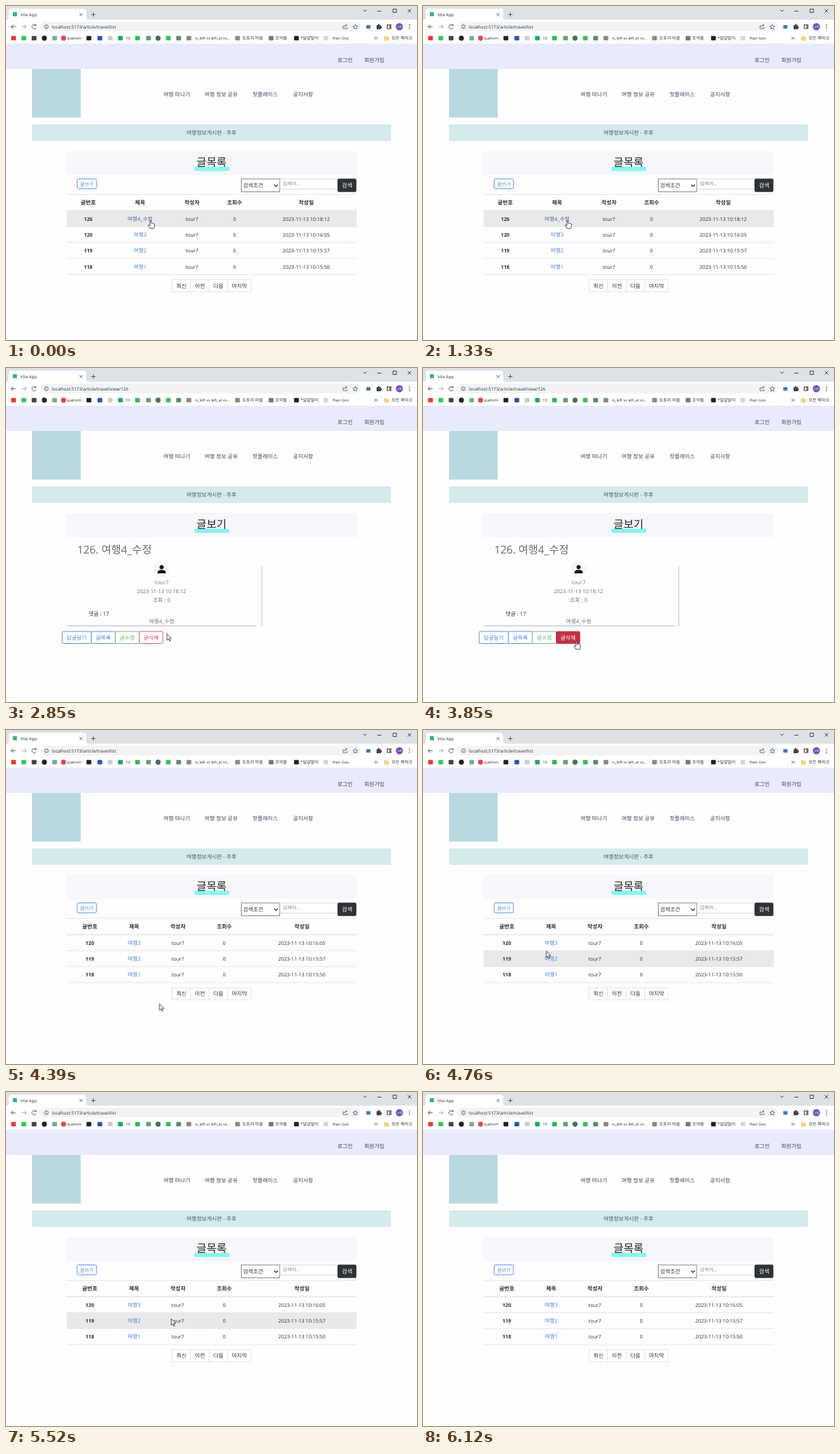
Write an HTML page that moves like this. It is 600x488 px and loops after 6180 ms.

```html
<!DOCTYPE html>
<html lang="ko">
<head>
<meta charset="utf-8">
<title>Travel board</title>
<style>
  html, body { margin: 0; width: 100%; height: 100%; overflow: hidden; background: #fefdff; }
  svg { display: block; width: 600px; height: 488px; }
  text { font-family: 'Open Sans', 'Noto Sans CJK KR', 'Noto Sans CJK', sans-serif; text-rendering: geometricPrecision; white-space: pre; }
</style>
</head>
<body>
<svg viewBox="0 0 600 488">
  <g id="chrome"></g>
  <g id="page"></g>
  <g id="cursor" stroke-linejoin="round">
    <path id="arrow" d="M0 0V9.4L2.2 7.4L3.7 10.7L5.2 10L3.7 6.8H6.6Z" fill="#fff" stroke="#222" stroke-width=".8"/>
    <path id="hand" d="M-.9 0Q0-1.2 .9 0V3.4Q2 2.8 2.6 3.7Q3.7 3.2 4.2 4.1Q5.6 3.8 5.7 5.2V7.7Q5.6 9.2 4.8 11H-.8Q-1.6 9-3.2 7Q-3.5 5.6-2.2 5.7L-.9 6.8Z" fill="#fff" stroke="#222" stroke-width=".8"/>
  </g>
</svg>
<script>
const LOOP = 6180, OPEN_POST = 1360, DELETED = 3880, POINTER_GONE = 5880;
const INK = '#2b3036', BLUE = '#4a82dc', GREY = '#80858b', USER = 'tour7';
const $ = id => document.getElementById(id);

const text = (x, y, str, { size = 8, fill = INK, anchor = 'middle', weight = 400 } = {}) =>
  `<text x="${x}" y="${y}" font-size="${size}" fill="${fill}" text-anchor="${anchor}" font-weight="${weight}">${str}</text>`;
const left = (x, y, str, size = 8, fill = INK) => text(x, y, str, { size, fill, anchor: 'start' });
const rect = (x, y, w, h, fill, r = 0, stroke = 'none') =>
  `<rect x="${x}" y="${y}" width="${w}" height="${h}" rx="${r}" fill="${fill}" stroke="${stroke}" stroke-width=".9"/>`;
const dot = (x, y, r, fill) => `<circle cx="${x}" cy="${y}" r="${r}" fill="${fill}"/>`;
const stroke = (d, color = '#50555a', width = 1) =>
  `<path d="${d}" fill="none" stroke="${color}" stroke-width="${width}"/>`;

function browser() {
  const squares = [[11, '#e33b35'], [26, '#35c759'], [41, '#444'], [71, '#7fa89b'], [121, '#222'], [137, '#2b56a5'],
    [152, '#c9cdd2'], [167, '#22a565'], [192, '#35b558'], [208, '#6f9b72'], [237, '#3ebd5c'], [252, '#5c8a6a'],
    [267, '#8c8780'], [338, '#8c8780'], [387, '#77777a'], [424, '#222'], [467, '#d5d8db']];
  const circles = [[56, '#222'], [84, '#dc4a48'], [222, '#4d6b66']];
  const labels = [[89, 'quelvim'], [175, '10'], [276, 'is_left vs left_at vs...'], [345, '도토리 마을'],
    [393, '조약돌'], [430, '*달걀말이'], [477, 'Rian Goo'], [563, '모든 북마크']];
  const labelSize = s => /[가-힣]/.test(s) ? 6.2 : 5.6;
  return rect(0, 0, 600, 20, '#dee1e6') +
    `<path d="M1 20Q4 20 4 16V8Q4 4 8 4H113Q117 4 117 8V16Q117 20 120 20Z" fill="#fff"/>` +
    rect(10, 9, 6, 6, '#3fb27f') + left(21, 14.6, 'Vite App', 6.2) +
    stroke('M107.5 10.5l4 4m0-4l-4 4M124.5 12.5h6m-3-3v6') +
    stroke('M521.5 5.5l2.5 2.5l2.5-2.5M542 7.5h6M565 4.5h5v5h-5zM586.5 4.5l5 5m0-5l-5 5', '#333', .9) +
    rect(0, 20, 600, 35, '#fff') + rect(50, 23, 468, 14, '#f1f3f4', 7) +
    stroke('M14 30.2H7.5m3-3l-3 3l3 3') + stroke('M23 30.2h6.5m-3-3l3 3l-3 3', '#a5a9ad') +
    stroke('M43.5 28.2A3.2 3.2 0 1 0 44 31.5M44 26.5v2.2h-2.4') +
    `<circle cx="59" cy="30.3" r="2.8" fill="none" stroke="#50555a" stroke-width=".8"/>` +
    stroke('M59 29.8v2m0-3.4v.6', '#50555a', .8) +
    stroke('M493.5 29H492v4h6v-2M493.8 31q.5-3 4-3m-1.7-1.7l1.8 1.7l-1.8 1.7', '#50555a', .8) +
    stroke('M510 27l1 2.2l2.4.3l-1.8 1.6l.5 2.4l-2.1-1.2l-2.1 1.2l.5-2.4l-1.8-1.6l2.4-.3z', '#50555a', .8) +
    rect(526, 28, 6, 5, '#4778ad') +
    `<path d="M541 28h2q0-2 1.2-2t1.2 2h2v2q1.6 0 1.6 1.2t-1.6 1.2v1.6H541z" fill="#444"/>` +
    stroke('M556.5 27.5h5.5v5.5h-5.5zM560.5 27.5v5.5', '#444', 1.1) +
    dot(574.3, 30.3, 5.2, '#7350b0') + text(574.3, 32, '나루', { size: 4.2, fill: '#fff' }) +
    [27.5, 30.3, 33.1].map(y => dot(589, y, .8, '#444')).join('') +
    squares.map(([x, c]) => rect(x - 3.5, 43.7, 7, 6.5, c, 1)).join('') +
    circles.map(([x, c]) => dot(x, 47, 3.7, c)).join('') +
    labels.map(([x, s]) => left(x, 49.3, s, labelSize(s))).join('') +
    stroke('M538 45l2 2l-2 2m2.5-4l2 2l-2 2', '#444', .8) +
    '<path d="M552 44h2.5l1 1h3.5v5.5h-7z" fill="#f3d27a"/>';
}

function site() {
  const menu = [[484, 82, '로그인'], [523, 82, '회원가입'], [230, 131.5, '여행 떠나기'],
    [290, 131.5, '여행 정보 공유'], [360, 131.5, '핫플레이스'], [419, 131.5, '공지사항']];
  return rect(0, 55, 600, 37, '#e9ebfb') + rect(38, 92, 71, 71, '#bad9df') +
    menu.map(([x, y, s]) => left(x, y, s, 8, '#3a4554')).join('') +
    rect(38, 173, 524, 24, '#d6eaec', 2) + text(300, 187.8, '여행정보게시판 - 추후', { fill: '#455a62' }) +
    rect(88, 212, 424, 35, '#f7f7fb') + rect(275, 235, 51, 6, '#86f6ef', 1);
}

const heading = str => text(300, 234, str, { size: 16, fill: '#222' });
const ROW_TOP = 299, ROW_H = 23.35;
const POSTS = [[126, '여행4_수정', '10:18:12'], [120, '여행3', '10:16:05'], [119, '여행2', '10:15:57'], [118, '여행1', '10:15:50']];
const BUTTONS = [[82, 42.5, '답글달기', BLUE], [124.5, 35, '글목록', BLUE], [159.5, 35, '글수정', '#64ad6c'], [194.5, 34.5, '글삭제', '#d05062']];

function list(posts, cols, hovered) {
  const line = (y, c = '#dfe2e6') => rect(88.5, y - .4, 423.5, .8, c);
  const heads = ['글번호', '제목', '작성자', '조회수', '작성일'];
  const rows = posts.map(([id, title, time], i) => {
    const top = ROW_TOP + i * ROW_H, y = top + 14.6;
    const cells = [id, title, USER, 0, '2023-11-13 ' + time];
    return (i === hovered ? rect(88.5, top, 423.5, ROW_H, '#e9e9ea') : '') + line(top + ROW_H) +
      cells.map((s, c) => text(cols[c], y, s, {
        size: c === 1 ? 7.8 : c === 2 ? 7.2 : 7.3, weight: c ? 400 : 700,
        fill: c !== 1 ? INK : i === hovered && title.length > 3 ? '#4c639c' : BLUE
      })).join('');
  }).join('');
  const bottom = ROW_TOP + posts.length * ROW_H + 7.6;
  const pager = [[242.5, 27, '최신'], [269.5, 27, '이전'], [296.5, 27, '다음'], [323.5, 34.5, '마지막']]
    .map(([x, w, s]) => rect(x, bottom, w, 17.5, '#fff', 0, '#dee2e6') + text(x + w / 2, bottom + 11.7, s)).join('');
  return heading('글목록') +
    rect(104, 252.7, 28, 14.3, '#fff', 1.5, BLUE) + text(118, 262.5, '글쓰기', { size: 7.3, fill: BLUE }) +
    rect(343.5, 252.8, 56, 18.6, '#fff', 0, '#777') + left(346, 265, '검색조건') +
    stroke('M391.5 261l2.7 2.7l2.7-2.7', '#222', 1.2) +
    rect(400, 252.8, 84, 14.8, '#fff', 0, '#d3d6da') + left(404, 262.4, '검색어...', 7, GREY) +
    rect(484, 252.3, 27.5, 19.5, '#2e3237', 2) + text(498, 265, '검색', { size: 8.3, fill: '#fff' }) +
    line(275.5) + line(ROW_TOP, '#c9ccd0') +
    heads.map((s, c) => text(cols[c], 289.7, s, { weight: 700 })).join('') + rows + pager;
}

function post(hovered) {
  return heading('글보기') + left(104, 271.2, '126. 여행4_수정', 15.7, '#666b70') +
    dot(227, 293.7, 11.5, '#f6f6f9') + dot(227.2, 291, 3, '#111') +
    `<path d="M221.2 300V298Q222 295 227.2 295T233.2 298V300Z" fill="#111"/>` +
    text(227.3, 315.6, USER, { fill: GREY }) +
    text(227, 328.8, '2023-11-13 10:18:12', { size: 7.6, fill: '#70757a' }) +
    text(227.3, 342, '조회 : 0', { fill: '#70757a' }) +
    left(120.5, 361.5, '댓글 : 17') + text(227.3, 373.2, '여행4_수정', { size: 7.9, fill: '#70757a' }) +
    rect(89, 376, 277, 1.5, '#cbccce') + rect(372.7, 290, 1.5, 87.5, '#d6d7d9') +
    BUTTONS.map(([x, w, s, c], i) => {
      const on = i === hovered;
      return rect(x, 385, w, 17.5, on ? '#c23145' : '#fff', 1.5, on ? '#b92c40' : c) +
        text(x + w / 2, 396.8, s, { fill: on ? '#fff' : c });
    }).join('');
}

// Pointer stops: time, x, y
const PATH = [[0, 211, 314], [1400, 211, 314], [1910, 297, 322], [2390, 297, 322], [3000, 224, 400],
  [4390, 224, 400], [4760, 180, 323], [4970, 188, 311], [5030, 188, 311], [5120, 190, 310],
  [5360, 190, 310], [5610, 262, 340], [LOOP, 262, 340]];

function pointerAt(t) {
  const i = PATH.findIndex(stop => stop[0] > t);
  const [t0, x0, y0] = PATH[i - 1], [t1, x1, y1] = PATH[i];
  const p = (t - t0) / (t1 - t0), e = p * p * (3 - 2 * p);
  return [x0 + (x1 - x0) * e, y0 + (y1 - y0) * e];
}

function sceneAt(t, x, y) {
  if (t >= OPEN_POST && t < DELETED) {
    const hovered = y > 385 && y < 403 ? BUTTONS.findIndex(([bx, w]) => x >= bx && x < bx + w) : -1;
    return { html: post(hovered), link: hovered >= 0 };
  }
  const before = t < OPEN_POST;
  const posts = before ? POSTS : POSTS.slice(1);
  const cols = before ? [120, 195.7, 271.5, 333.7, 438.3] : [122.3, 187, 251, 318.7, 432];
  const row = t < POINTER_GONE ? Math.floor((y - ROW_TOP) / ROW_H) : -1;
  const inRow = (y - ROW_TOP) / ROW_H - row;
  const half = posts[row] ? posts[row][1].length * 3.2 : 0;
  return { html: list(posts, cols, row), link: Math.abs(x - cols[1]) < half && inRow > .25 && inRow < .8 };
}

let shown = '';
function draw(now) {
  const t = now % LOOP, [x, y] = pointerAt(t), { html, link } = sceneAt(t, x, y);
  if (html !== shown) $('page').innerHTML = shown = html;
  $('url').textContent = 'localhost:5173/article/travel/' + (t >= OPEN_POST && t < DELETED ? 'view/126' : 'list');
  $('cursor').setAttribute('transform', `translate(${x.toFixed(2)} ${y.toFixed(2)})`);
  $('cursor').style.display = t < POINTER_GONE ? '' : 'none';
  $('hand').style.display = link ? '' : 'none';
  $('arrow').style.display = link ? 'none' : '';
  requestAnimationFrame(draw);
}

$('chrome').innerHTML = browser() + site() + left(67, 32.6, '', 6.4).replace('<text', '<text id="url"');
draw(performance.now());
</script>
</body>
</html>
```
